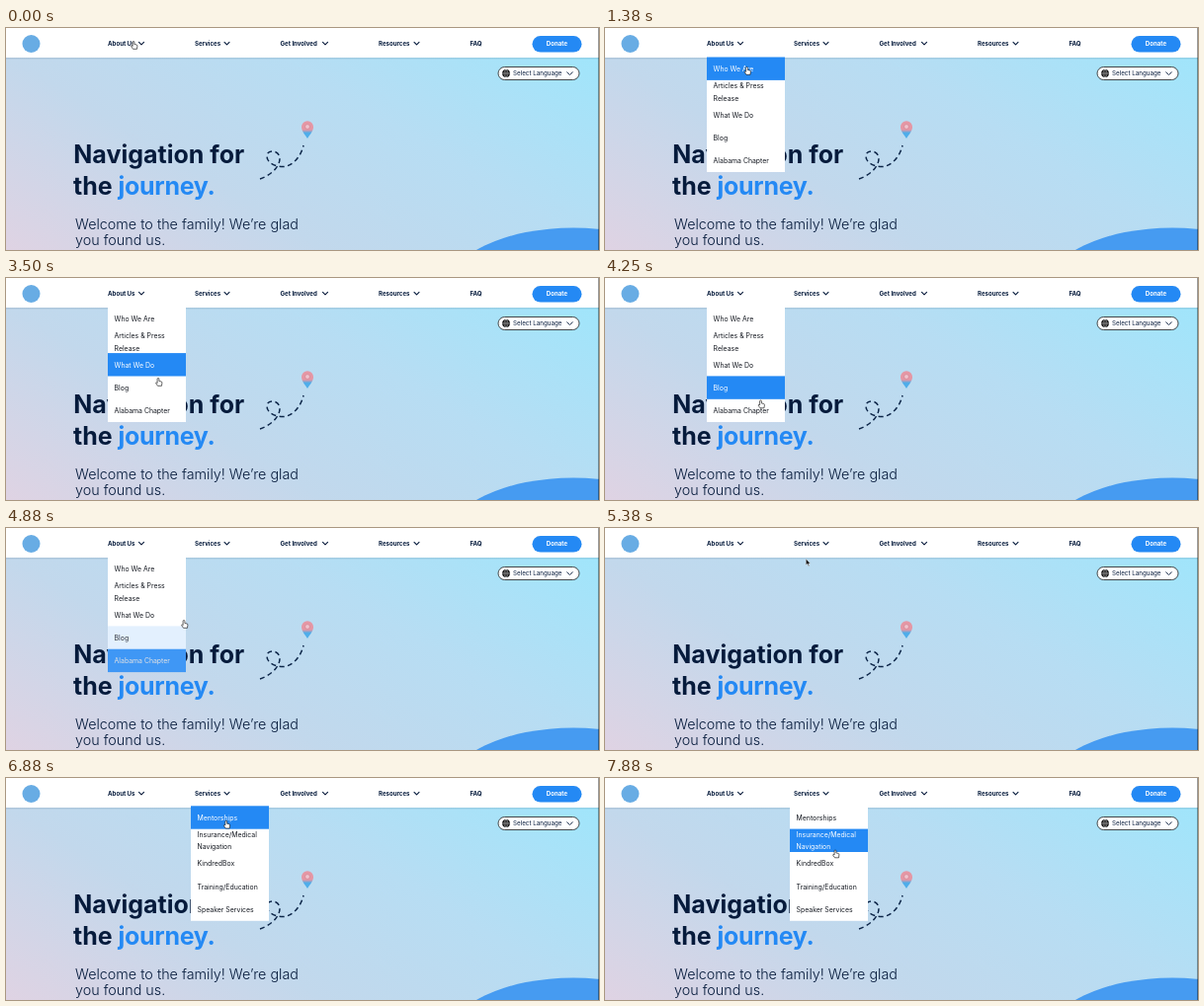
Animation, 600 px wide and 225 px high, one loop 8000 ms. Source, as an HTML page:

```html
<!DOCTYPE html>
<html lang="en">
<head>
<meta charset="utf-8">
<title>Navigation menu</title>
<style>
  html, body { margin: 0; width: 100%; height: 100%; overflow: hidden; }
  svg { display: block; width: 100vw; height: 100vh; }
  text { font-family: Inter, "Open Sans", sans-serif; fill: #061b3c; }
  .nav { font-size: 6.1px; font-weight: 700; }
  .title { font-size: 25px; font-weight: 700; }
  .lead { font-size: 14.35px; font-weight: 300; }
  .menu text { font-size: 6.9px; font-weight: 400; }
  .chevron { fill: none; stroke: #061b3c; stroke-width: 1.1; stroke-linecap: round; stroke-linejoin: round; }
  .cursor { fill: #fff; stroke: #111; stroke-width: .65; stroke-linejoin: round; }
</style>
</head>
<body>
<svg id="stage" viewBox="0 0 600 225" preserveAspectRatio="none">
  <defs>
    <linearGradient id="sky" gradientUnits="userSpaceOnUse" x1="0" y1="225" x2="252" y2="-185">
      <stop offset="0" stop-color="#dfd3e3"/>
      <stop offset=".35" stop-color="#c2d8ec"/>
      <stop offset=".65" stop-color="#b7ddf3"/>
      <stop offset="1" stop-color="#a0e5fb"/>
    </linearGradient>
    <linearGradient id="pin" x1="0" y1="0" x2="0" y2="1">
      <stop offset=".5" stop-color="#e596a4"/>
      <stop offset=".68" stop-color="#4fadea"/>
    </linearGradient>
    <linearGradient id="shade" x1="0" y1="0" x2="0" y2="1">
      <stop offset="0" stop-color="#20405c" stop-opacity=".15"/>
      <stop offset="1" stop-color="#20405c" stop-opacity="0"/>
    </linearGradient>
  </defs>

  <rect width="600" height="225" fill="url(#sky)"/>
  <ellipse cx="574" cy="263" rx="126" ry="60.5" fill="#469bf1"/>

  <text class="title" x="68.3" y="137">Navigation for</text>
  <text class="title" x="68" y="169.3">the</text>
  <text class="title" x="113.6" y="169.3" style="fill:#2489f4;letter-spacing:-.3px">journey.</text>
  <text class="lead" x="70" y="203.5">Welcome to the family! We’re glad</text>
  <text class="lead" x="70" y="220">you found us.</text>

  <path d="M257 153C266 150 277 142 277 132C277 124 264 122 264 130C264 138 276 142 284 140C293 137 299 128 301 119"
    fill="none" stroke="#0b2447" stroke-width="1.5" stroke-dasharray="5 3.5"/>
  <path d="M305 112C302.5 108 299 104.5 299 100.2A6 6 0 0 1 311 100.2C311 104.5 307.5 108 305 112Z" fill="url(#pin)"/>
  <circle cx="305" cy="100" r="2.4" fill="#efc3cd" stroke="#d48393" stroke-width=".7"/>

  <rect x="498" y="39.5" width="82" height="13" rx="6.5" fill="#fff" stroke="#2a2a2a" stroke-width=".85"/>
  <circle cx="506" cy="46" r="3.9" fill="#111"/>
  <path d="M502 46H510M506 42V50" stroke="#fff" stroke-width=".4"/>
  <ellipse cx="506" cy="46" rx="1.9" ry="3.8" fill="none" stroke="#fff" stroke-width=".35"/>
  <text x="513" y="48.3" font-size="6.25" font-weight="400">Select Language</text>
  <path class="chevron" style="stroke-width:.9" d="M567.7 44.8l2.8 2.7l2.8 -2.7"/>

  <rect x="0" y="30" width="600" height="2.5" fill="url(#shade)"/>
  <rect width="600" height="30" fill="#fff"/>
  <circle cx="25.5" cy="16" r="9" fill="#68ace4"/>
  <g id="nav"></g>
  <text class="nav" x="469.5" y="18.3">FAQ</text>
  <rect x="532.5" y="8" width="50" height="16.6" rx="8.3" fill="#2489f4"/>
  <text class="nav" x="557.5" y="18.4" text-anchor="middle" style="fill:#fff">Donate</text>
  <rect x="599" width="1" height="225" fill="#000" opacity=".4"/>

  <g id="menus"></g>
  <path id="hand" class="cursor" d="M-.9 .9a.9 .9 0 0 1 1.8 0V3L2.9 3.4Q4 3.6 3.9 4.7L3.5 7.8H-.5L-2.3 5.2Q-2.3 4.1 -1.4 4.4L-.9 4.9Z"/>
  <path id="arrow" class="cursor" style="fill:#111;stroke:#fff;stroke-width:.4" d="M0 0V6.2L1.5 4.9L2.5 7.2L3.5 6.8L2.5 4.6H4.4Z"/>
</svg>
<script>
const LOOP = 8000, STEP = 125, FADE = 200;
const byId = id => document.getElementById(id);

function add(parent, tag, attrs, text = "") {
  const el = document.createElementNS("http://www.w3.org/2000/svg", tag);
  for (const key in attrs) el.setAttribute(key, attrs[key]);
  el.textContent = text;
  return parent.appendChild(el);
}

for (const [label, x, chevron] of [
  ["About Us", 103, 137], ["Services", 191, 223.5],
  ["Get Involved", 277.5, 323], ["Resources", 377, 415.5]
]) {
  add(byId("nav"), "text", { class: "nav", x, y: 17.8 }, label);
  add(byId("nav"), "path", { class: "chevron", d: `M${chevron - 2.5} 14.3l2.5 2.5l2.5 -2.5` });
}

// Each row: its lines, then the spans of time it is hovered.
const menus = [
  { x: 103, y: 29.5, open: [375, 5000], rows: [
    [["Who We Are"], [875, 1875]],
    [["Articles & Press", "Release"], [1875, 2800]],
    [["What We Do"], [2800, 3500]],
    [["Blog"], [3500, 4300], [4850, 4950]],
    [["Alabama Chapter"], [4300, 4850]]
  ] },
  { x: 187, y: 28.3, open: [6250, 9000], rows: [
    [["Mentorships"], [6625, 7250]],
    [["Insurance/Medical", "Navigation"], [7250, 9000]],
    [["KindredBox"]],
    [["Training/Education"]],
    [["Speaker Services"]]
  ] }
];

for (const menu of menus) {
  const { x, y } = menu;
  menu.el = add(byId("menus"), "g", { class: "menu" });
  add(menu.el, "rect", { x, y, width: 79, height: 116.5, fill: "#fff" });
  menu.items = menu.rows.map(([lines, ...spans], i) => {
    const top = y + i * 23.3;
    const bar = add(menu.el, "rect", { x, y: top, width: 79, height: 23.4, fill: "#2489f4" });
    const texts = lines.map((line, n) => add(menu.el, "text", {
      x: x + 6.6, y: top + (lines.length > 1 ? 8.4 + n * 12.4 : 14.4)
    }, line));
    return { bar, texts, spans };
  });
}

// time, x, y of the pointer tip
const path = [
  [0, 129, 13.5], [250, 129, 13.5], [625, 134, 21], [1000, 141, 34], [1375, 143.5, 39.5],
  [1750, 145, 48], [2125, 147, 61], [2750, 148.7, 78], [3250, 152, 90], [3750, 156, 113],
  [4000, 157, 120], [4125, 157, 120], [4250, 157.5, 124], [4500, 164, 131], [4750, 176, 126],
  [4875, 180, 93.5], [5125, 192, 52], [5500, 209, 21], [6000, 212.5, 16.5], [6375, 215, 24],
  [6750, 221, 39], [7250, 228, 56], [7875, 233, 73], [8000, 233, 74]
];
const arrowSpans = [[2625, 2875], [5000, 5500]];

const clamp = v => Math.max(0, Math.min(1, v));
const within = (t, [a, b]) => t >= a && t < b;
const fade = (t, [a, b]) => clamp((t - a) / FADE) * (1 - clamp((t - b) / FADE));
const mix = (a, b, k) => Math.round(a + (b - a) * k);

function pointer(t) {
  const i = path.findIndex(p => p[0] > t);
  const [t0, x0, y0] = path[i - 1], [t1, x1, y1] = path[i];
  const k = (t - t0) / (t1 - t0);
  return [x0 + (x1 - x0) * k, y0 + (y1 - y0) * k];
}

function draw(t) {
  for (const menu of menus) {
    menu.el.setAttribute("opacity", fade(t, menu.open));
    for (const { bar, texts, spans } of menu.items) {
      const k = Math.max(0, ...spans.map(s => fade(t, s)));
      bar.setAttribute("opacity", k);
      const color = `rgb(${mix(20, 255, k)},${mix(24, 255, k)},${mix(32, 255, k)})`;
      for (const text of texts) text.style.fill = color;
    }
  }
  const [x, y] = pointer(t);
  const isArrow = arrowSpans.some(s => within(t, s));
  for (const id of ["hand", "arrow"]) {
    byId(id).setAttribute("transform", `translate(${x} ${y})`);
    byId(id).style.display = (id === "arrow") === isArrow ? "" : "none";
  }
}

const start = performance.now();
function tick(now) {
  const t = Math.max(0, now - start) % LOOP;
  draw(Math.floor(t / STEP) * STEP);
  requestAnimationFrame(tick);
}
draw(0);
requestAnimationFrame(tick);
</script>
</body>
</html>
```
